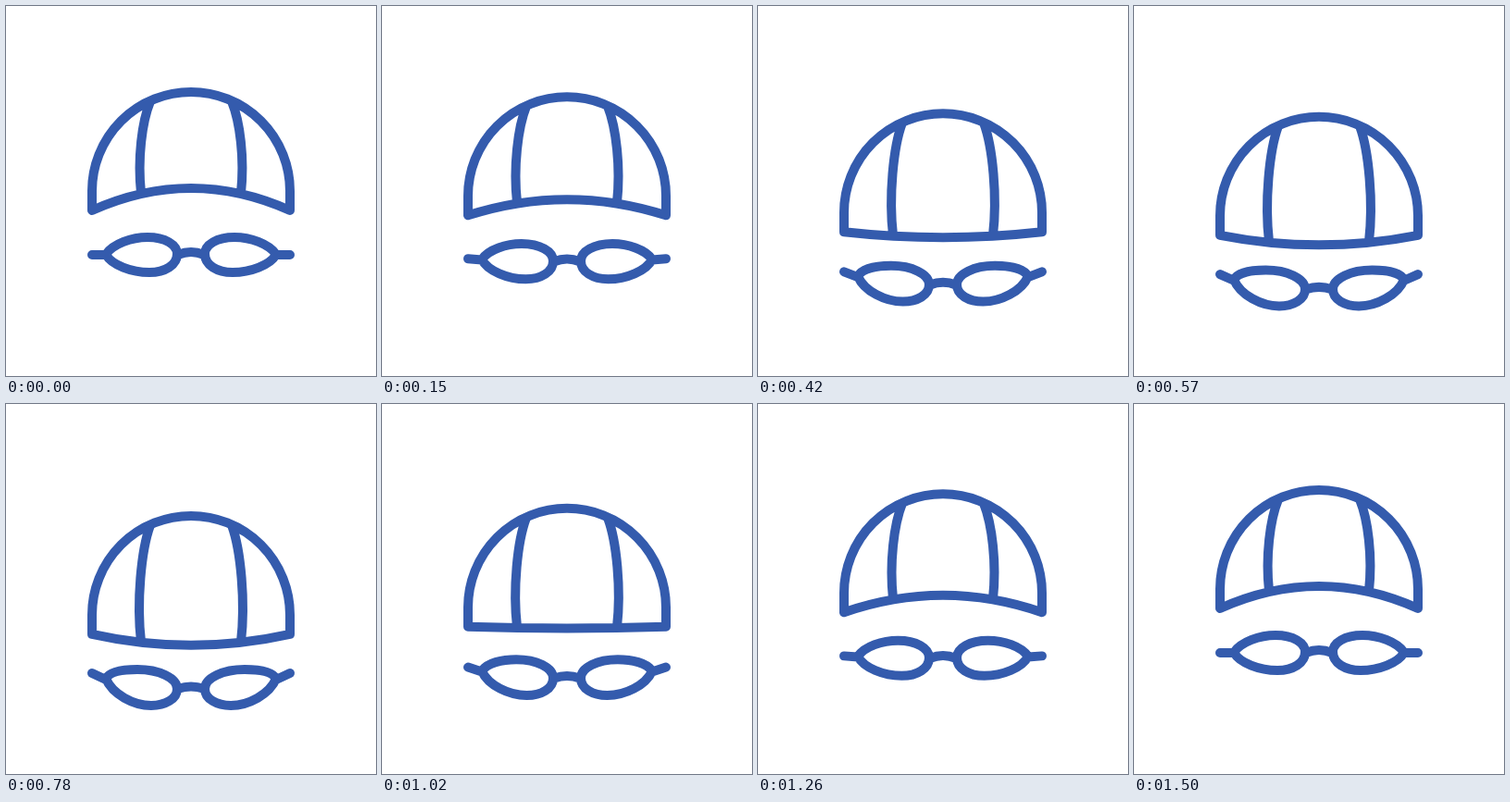
An HTML page with a canvas for the animation above (3530 ms loop, 400 by 400 pixels).

```html
<!DOCTYPE html>
<html lang="en">
<head>
<meta charset="utf-8">
<title>Swim cap and goggles</title>
<style>
html, body { margin: 0; width: 100%; height: 100%; overflow: hidden; background: #fff; }
canvas { display: block; width: 400px; height: 400px; }
</style>
</head>
<body>
<canvas id="stage" width="400" height="400"></canvas>
<script>
const ctx = document.getElementById('stage').getContext('2d');
const LOOP = 3530, HALF = 750, STEP = 30;

// Cubic easing with flat ends; x1 and x2 are the handle positions in time.
function ease(u, x1, x2) {
  if (u <= 0) return 0;
  if (u >= 1) return 1;
  let lo = 0, hi = 1, s = 0.5;
  for (let i = 0; i < 24; i++) {
    s = (lo + hi) / 2;
    const r = 1 - s;
    const x = 3 * x1 * s * r * r + 3 * x2 * s * s * r + s * s * s;
    if (x < u) lo = s; else hi = s;
  }
  return s * s * (3 - 2 * s);
}

// 0 = raised, 1 = lowered
function pose(t) {
  return t < HALF ? ease(t / HALF, 0.31, 0.255)
                  : 1 - ease((t - HALF) / HALF, 0.46, 0.453);
}

function drawHalf(p) {
  const mix = (a, b) => a + (b - a) * p;
  const dy = 28 * p;

  // seam
  ctx.moveTo(156, 103 + dy);
  ctx.bezierCurveTo(mix(147, 146), mix(125, 158), mix(142, 141), mix(165, 215), 146, mix(202, 257));

  // strap
  ctx.moveTo(93, mix(269, 291));
  ctx.lineTo(108, mix(269, 298));

  // lens
  const tip = mix(268.5, 297);
  ctx.moveTo(108, tip);
  ctx.bezierCurveTo(mix(116, 112), mix(257, 289), mix(136, 128), mix(250, 287), mix(153, 142), mix(250, 287));
  ctx.bezierCurveTo(mix(172, 165), mix(250, 287), 185, mix(258, 296), 185, mix(268, 308));
  ctx.bezierCurveTo(185, mix(280, 319), 172, mix(288, 326), mix(155, 157), mix(288, 326));
  ctx.bezierCurveTo(mix(136, 138), mix(288, 326), mix(114, 115), mix(280, 314), 108, tip);
  ctx.closePath();
}

function draw(p) {
  const dy = 28 * p;
  const rim = 221 + dy, mid = 197 + 64 * p;
  const bridge = 269 + 39 * p;

  ctx.setTransform(1, 0, 0, 1, 0, 0);
  ctx.fillStyle = '#fff';
  ctx.fillRect(0, 0, 400, 400);
  ctx.strokeStyle = '#345bad';
  ctx.lineWidth = 10;
  ctx.lineCap = ctx.lineJoin = 'round';

  ctx.beginPath();
  // cap
  ctx.moveTo(93, rim);
  ctx.lineTo(93, 200 + dy);
  ctx.arc(200, 200 + dy, 107, Math.PI, 2 * Math.PI);
  ctx.lineTo(307, rim);
  ctx.quadraticCurveTo(200, 2 * mid - rim, 93, rim);
  ctx.closePath();

  // bridge
  ctx.moveTo(186, bridge);
  ctx.quadraticCurveTo(200, bridge - 6 + p, 214, bridge);

  drawHalf(p);
  ctx.setTransform(-1, 0, 0, 1, 400, 0);
  drawHalf(p);
  ctx.setTransform(1, 0, 0, 1, 0, 0);
  ctx.stroke();
}

const start = performance.now();
function tick() {
  const t = (performance.now() - start) % LOOP;
  draw(pose(Math.floor(t / STEP) * STEP));
  requestAnimationFrame(tick);
}
tick();
</script>
</body>
</html>
```
